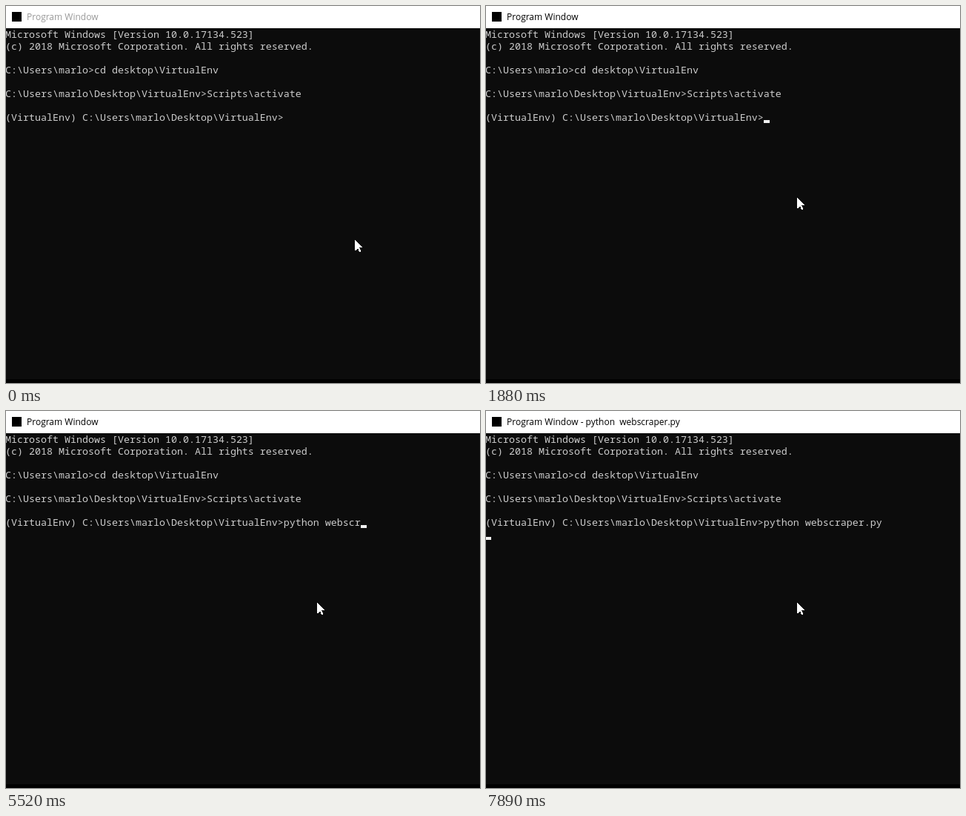
Write an HTML page that moves like this. It is 640x509 px and loops after 8000 ms.

```html
<!DOCTYPE html>
<html lang="en">
<head>
<meta charset="utf-8">
<style>
  html, body { margin: 0; width: 100%; height: 100%; overflow: hidden; background: #0c0c0c; }
  svg { display: block; width: 640px; height: 509px; }
  text { white-space: pre; }
  #title { font: 12px "Open Sans", "Noto Sans", sans-serif; }
  #lines { font: 13.3333px "Noto Sans Mono", "Liberation Mono", monospace; fill: #ccc; }
</style>
</head>
<body>
<svg viewBox="0 0 640 509">
  <rect width="640" height="30" fill="#fff"/>
  <rect y="504" width="640" height="5" fill="#000"/>
  <rect x="8" y="8" width="13" height="13" fill="#000"/>
  <text id="title" x="28" y="19"></text>
  <g id="lines"></g>
  <rect id="caret" width="8" height="4" fill="#f2f2f2"/>
  <path id="mouse" d="M0 0V14H1L4 11L6 16H8V14L6 10H10.5Z" fill="#fff" shape-rendering="crispEdges"/>
</svg>
<script>
const LOOP = 8000, CELL = 8, ROW = 16, LEFT = -1;
const FOCUS = 1357, BLINK = 522, KEY_GAP = 115, ENTER = 7860;
const $ = id => document.getElementById(id);
const set = (el, attrs) => Object.entries(attrs).forEach(([k, v]) => el.setAttribute(k, v));

const home = 'C:\\Users\\marlo';
const prompt = `(VirtualEnv) ${home}\\Desktop\\VirtualEnv>`;
const name = 'Program Window';

const rows = [
  'Microsoft Windows [Version 10.0.17134.523]',
  '(c) 2018 Microsoft Corporation. All rights reserved.',
  '',
  home + '>cd desktop\\VirtualEnv',
  '',
  home + '\\Desktop\\VirtualEnv>Scripts\\activate',
  '',
  prompt
].map((line, i) => {
  const el = document.createElementNS('http://www.w3.org/2000/svg', 'text');
  set(el, { x: LEFT, y: 43 + ROW * i });
  el.textContent = line;
  $('lines').append(el);
  return el;
});
const input = rows[7];

// Bursts of typing: each starts at its time and runs at an even pace.
const bursts = [
  [2500, 'p'], [3195, 'ython'], [3990, ' '], [4510, 'websc'],
  [5280, 'r'], [5590, 'aper'], [6340, '.'], [6640, 'py']
];
const keys = bursts.flatMap(([start, text]) =>
  [...text].map((char, i) => ({ char, time: start + KEY_GAP * i })));

// The caret flips at every tick; a key press shows it again.
const tick = t => Math.floor((t - FOCUS) / BLINK);
const caretOn = (t, lastKey) => t >= FOCUS && (tick(t) - tick(lastKey)) % 2 === 0;

function mousePos(t) {
  const step = Math.floor((t - 110) / 27) + 1;
  const p = Math.min(1, Math.max(0, step / 11));
  const k = p * p * (3 - 2 * p);
  return [Math.round(471 - 51 * k), Math.round(316 - 57 * k)];
}

function draw(t) {
  const entered = t >= ENTER;
  const typed = keys.filter(key => key.time <= t);
  const lastKey = entered ? ENTER : typed.at(-1)?.time ?? FOCUS - BLINK;
  input.textContent = prompt + typed.map(key => key.char).join('');
  set($('caret'), {
    x: LEFT + (entered ? 0 : CELL * input.textContent.length),
    y: entered ? 170 : 154,
    opacity: +caretOn(t, lastKey)
  });
  $('title').textContent = name + (t >= ENTER + 30 ? ' - python  webscraper.py' : '');
  set($('title'), { fill: t < FOCUS ? '#999' : '#000' });
  set($('mouse'), { transform: `translate(${mousePos(t)})` });
}

const start = performance.now();
function frame() {
  draw((performance.now() - start) % LOOP);
  requestAnimationFrame(frame);
}
frame();
</script>
</body>
</html>
```
